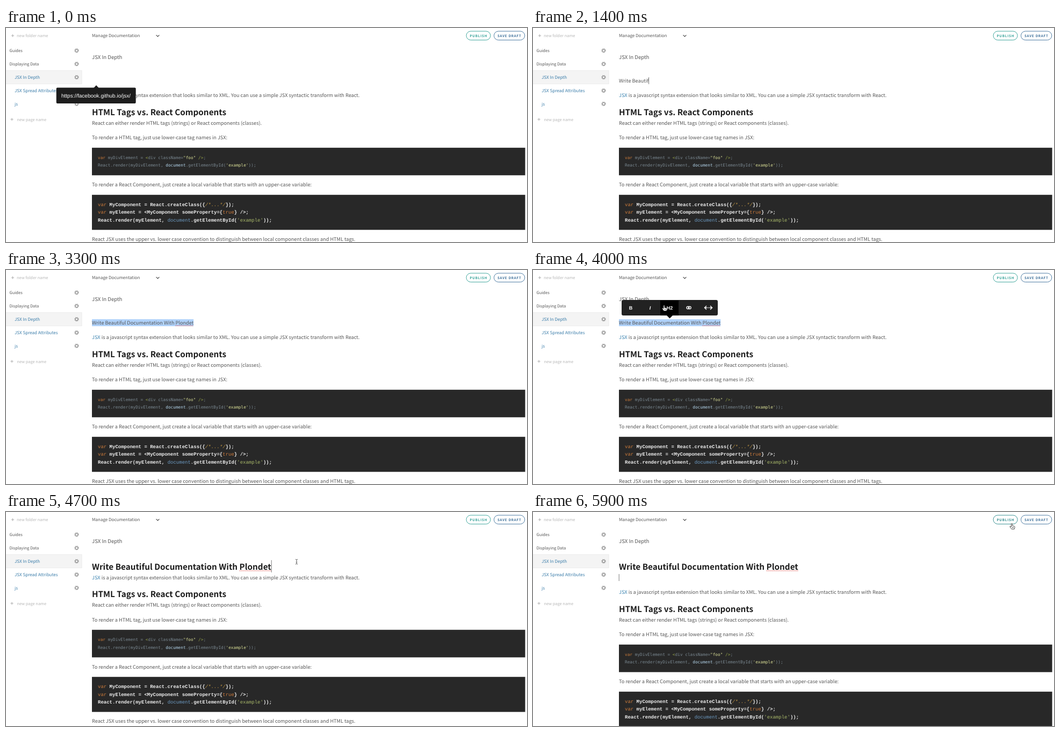
These frames come from a looping animation (970 by 400 pixels, 6150 ms). An HTML page:

```html
<!DOCTYPE html>
<html lang="en">
<head>
<meta charset="utf-8">
<title>Documentation editor</title>
<style>
  html, body { margin: 0; width: 100%; height: 100%; overflow: hidden; background: #fff; }
  svg { display: block; overflow: hidden; }
  text {
    font-family: "Noto Sans CJK JP", "Noto Sans CJK SC", "Noto Sans CJK", "Source Sans Pro", "Open Sans", sans-serif;
    white-space: pre; fill: #565656; text-rendering: geometricPrecision;
  }
  .body { font-size: 9.17px; }
  .title { font-size: 9.6px; }
  .h2 { font-size: 15.25px; font-weight: 700; fill: #1c1c1c; }
  .menu { font-size: 8.03px; }
  .folder { font-size: 7.55px; }
  .page { font-size: 8px; fill: #3a7ca9; }
  .new { font-size: 7.46px; fill: #b8b8b8; }
  .btn { font-size: 6.2px; font-weight: 700; letter-spacing: .8px; }
  .tip { font: 10px "Liberation Sans", Arial, sans-serif; fill: #fff; }
  .tool { font: bold 9px "Liberation Sans", Arial, sans-serif; fill: #fff; text-anchor: middle; }
  .mono { font: 7.78px "DejaVu Sans Mono", monospace; fill: #7a8891; }
  .courier { font: bold 9px "Liberation Mono", "Courier New", monospace; fill: #ececec; }
  .link { fill: #3a83b0; }
  .kw { fill: #cb7a3a; font-weight: 400; }
  .tag { fill: #96a548; }
  .str { fill: #dbe097; }
  .str2 { fill: #a9b96a; font-weight: 400; }
  .doc { fill: #b4d6ec; }
  .doc2 { fill: #6d9bc3; font-weight: 400; }
  .note { fill: #c79a45; font-weight: 400; font-style: italic; }
</style>
</head>
<body>
<svg id="stage" width="970" height="400" viewBox="0 0 970 400"></svg>
<script>
const LOOP = 6150, STEP = 100;
const LINE = "Write Beautiful Documentation With ", NAME = "Plondet";
const FULL = LINE + NAME;

const text = (cls, x, y, s, extra = "") => `<text class="${cls}" x="${x}" y="${y}" ${extra}>${s}</text>`;
const span = (cls, s) => `<tspan class="${cls}">${s}</tspan>`;
const rect = (x, y, w, h, fill, extra = "") =>
  `<rect x="${x}" y="${y}" width="${w}" height="${h}" fill="${fill}" ${extra}/>`;
const path = (d, stroke, width, extra = "") =>
  `<path d="${d}" fill="none" stroke="${stroke}" stroke-width="${width}" ${extra}/>`;

const gear = y => `<g transform="translate(131.5 ${y})" fill="none" stroke="#959595">
  <circle r="2.4" stroke-width="1.3"/>
  <circle r="3.5" stroke-width="1.3" stroke-dasharray="1.5 1.249"/></g>`;
const plus = (x, y) => path(`M${x - 2.6} ${y}h5.2M${x} ${y - 2.6}v5.2`, "#a8a8a8", .9);
const pill = (id, x, w, color, label) =>
  `<g id="${id}">${rect(x, 6, w, 16.5, "#fff", `rx="8.25" stroke="${color}" stroke-width=".9"`)}` +
  text("btn", x + 6.4, 16.9, label, `style="fill:${color}"`) + `</g>`;

const sidebar =
  plus(12.5, 14.3) + text("new", 20, 17, "new folder name") +
  rect(-1, 79.5, 142, 25, "#f4f4f4", 'stroke="#ececec"') +
  text("folder", 6.5, 44.6, "Guides") + text("folder", 6.5, 69.6, "Displaying Data") +
  ["JSX In Depth", "JSX Spread Attributes", "js"]
    .map((s, i) => text("page", 16, 95.1 + 25 * i, s)).join("") +
  [42.2, 67.2, 92, 117, 141.8].map(gear).join("") +
  plus(11, 170.8) + text("new", 20.4, 173.6, "new page name");

const header =
  text("menu", 160, 17.4, "Manage Documentation") +
  path("M279.6 13.2l2.9 2.8 2.9-2.8", "#444", 1.1) +
  pill("publish", 857, 45, "#2f9f95", "PUBLISH") +
  pill("save", 908.5, 57.3, "#3c6f9a", "SAVE DRAFT") +
  text("title", 160, 57.5, "JSX In Depth");

const content =
  text("body", 160, 129.4, span("link", "JSX") +
    " is a javascript syntax extension that looks similar to XML. You can use a simple JSX syntactic transform with React.") +
  text("h2", 160, 162.7, "HTML Tags vs. React Components") +
  text("body", 160, 180.8, "React can either render HTML tags (strings) or React components (classes).") +
  text("body", 160, 208.4, "To render a HTML tag, just use lower-case tag names in JSX:") +
  rect(160, 223.8, 806.6, 51.5, "#282828") +
  text("mono", 171, 245, span("kw", "var") + " myDivElement = " + span("tag", "&lt;") + "div className=" +
    span("str", '"foo"') + span("tag", " /&gt;") + ";") +
  text("mono", 171, 259.4, "React.render(myDivElement, " + span("doc", "document") + ".getElementById(" +
    span("str", "'example'") + "));") +
  text("body", 160, 296.4, "To render a React Component, just create a local variable that starts with an upper-case variable:") +
  rect(160, 311.8, 806.6, 65.5, "#282828") +
  text("courier", 171, 333, span("kw", "var") + " MyComponent = React.createClass({" + span("note", "/*...*/") + "});") +
  text("courier", 171, 347.4, span("kw", "var") + " myElement = &lt;MyComponent someProperty={" + span("kw", "true") + "} /&gt;;") +
  text("courier", 171, 361.8, "React.render(myElement, " + span("doc2", "document") + ".getElementById(" +
    span("str2", "'example'") + "));") +
  text("body", 160, 398, "React JSX uses the upper vs. lower case convention to distinguish between local component classes and HTML tags.");

const tooltip = `<g id="tooltip"><path d="M163.3 112l4.7-5 4.7 5z" fill="#1d1d1d"/>` +
  rect(93.7, 111.5, 148, 29.5, "#1d1d1d", 'rx="2"') +
  text("tip", 103, 129.8, "https://facebook.github.io/jsx/") + `</g>`;

const toolbar = `<g id="toolbar">` + rect(165, 56, 179, 29, "#222", 'rx="3"') +
  `<g id="active">${rect(237, 57, 34, 28, "#000")}</g><path d="M249 85h11l-5.5 5.5z" fill="#0c0c0c"/>` +
  text("tool", 182, 74, "B") + text("tool", 218, 74, "I", 'style="font-style:italic"') +
  text("tool", 254.5, 74, "H2") +
  rect(286, 68.2, 5, 4.6, "none", 'rx="2.3" stroke="#fff" stroke-width="1.3"') +
  rect(289.2, 68.2, 5, 4.6, "none", 'rx="2.3" stroke="#fff" stroke-width="1.3"') +
  path("M323 67l-3.6 3.5 3.6 3.5M330 67l3.6 3.5-3.6 3.5M320 70.5h4.6M328.4 70.5h4.6M325.8 70.5h1.4", "#fff", 1.3) +
  `</g>`;

const pointers =
  `<g id="beam">${path("M-2.2 -4.5q2.2 0 2.2 1.4v6.2q0 1.4-2.2 1.4M2.2 -4.5q-2.2 0-2.2 1.4M2.2 4.5q-2.2 0-2.2-1.4M-1.3 .9h2.6", "#555", .9)}</g>` +
  `<path id="arrow" d="M0 0v8.2l1.9-1.7 1.3 3 1.4-.6-1.3-2.9h2.6z" fill="#111" stroke="#fff" stroke-width=".6"/>` +
  `<path id="hand" d="M-1 .4q1-1.2 2 0v3.8l3.4.8q1.5.5 1.1 2.3l-.9 3.2h-4.9l-3.3-4.3q-.2-1.5 1.3-.9l1.3 1zM1.2 6.6v2M2.8 6.6v2" fill="#fff" stroke="#222" stroke-width=".8" stroke-linejoin="round"/>`;

document.getElementById("stage").innerHTML =
  rect(0, 0, 970, 400, "#fff") + sidebar + header +
  rect(160, 92, 0, 13, "#b0d2fa", 'id="mark"') +
  `<text id="line" x="160"></text>` +
  path("", "#e0554f", 1.2, 'id="squiggle" stroke-dasharray="1.2 1.2"') +
  `<g id="content">${content}</g>` +
  rect(0, 0, .9, 13, "#707070", 'id="caret"') + toolbar + tooltip + `<g id="pointer">${pointers}</g>`;

const $ = id => document.getElementById(id);
const show = (id, on) => $(id).setAttribute("visibility", on ? "inherit" : "hidden");
const set = (id, attrs) => { for (const k in attrs) $(id).setAttribute(k, attrs[k]); };
const within = (t, a, b) => t >= a && t < b;

// Linear interpolation through [time, value...] keys.
function track(keys, t) {
  if (t <= keys[0][0]) return keys[0].slice(1);
  for (let i = 1; i < keys.length; i++) {
    const [a, b] = [keys[i - 1], keys[i]];
    if (t <= b[0]) {
      const k = (t - a[0]) / (b[0] - a[0]);
      return a.slice(1).map((v, j) => v + (b[j + 1] - v) * k);
    }
  }
  return keys[keys.length - 1].slice(1);
}

const typing = [[400, 0], [500, 1], [600, 1], [700, 2], [1400, 13], [2400, 32], [2700, 37], [3000, 42]];
const mouse = [[3600, 300, 100], [3700, 274, 85], [3800, 250, 70], [3900, 244, 66], [4200, 244, 66],
  [4300, 335, 77], [4400, 465, 89], [4500, 541, 93], [4700, 541, 93], [4800, 569.5, 89],
  [4900, 575, 88], [5200, 715, 58], [5500, 893, 18], [5700, 891.5, 21.5]];

function draw(t) {
  const heading = t >= 4100, newline = t >= 4800;
  const selected = within(t, 3200, 4500);
  const line = $("line");

  line.textContent = FULL.slice(0, Math.floor(track(typing, t)[0] + 1e-6));
  set("line", { class: heading ? "h2" : "body", y: heading ? 107.7 : 101.8 });
  const width = line.textContent ? line.getComputedTextLength() : 0;

  set("mark", heading ? { width, y: 91, height: 22 } : { width, y: 92, height: 13 });
  show("mark", selected);

  const spelled = t >= 3100;
  show("squiggle", spelled);
  if (spelled) {
    const x = 160 + line.getSubStringLength(0, LINE.length), y = heading ? 109.8 : 104.2;
    set("squiggle", { d: `M${x} ${y}H${160 + width}` });
  }

  set("content", { transform: `translate(0 ${newline ? 24 : heading ? -3.6 : 0})` });

  show("caret", t >= 300 && !selected && !within(t, 5100, 5500));
  set("caret", newline ? { x: 159.7, y: 116, height: 13 }
    : { x: 160 + width, y: heading ? 90 : 92, height: heading ? 23 : 13 });

  show("tooltip", t < 200);
  show("toolbar", within(t, 3400, 4500));
  set("toolbar", { transform: `translate(0 ${t < 3500 ? 4 : 0})`, opacity: t < 3500 ? .7 : 1 });
  show("active", t >= 3800 && t < 4500);

  const [x, y] = track(mouse, t);
  const kind = within(t, 3800, 4300) || t >= 5500 ? "hand" : newline ? "arrow" : "beam";
  set("pointer", { transform: `translate(${x} ${y})` });
  for (const id of ["beam", "arrow", "hand"]) show(id, id === kind && t >= 3600);

  const tone = t >= 5500 ? "#28878a" : "#2f9f95";
  $("publish").firstChild.setAttribute("stroke", tone);
  $("publish").lastChild.style.fill = tone;
}

const start = performance.now();
function tick() {
  const t = (performance.now() - start) % LOOP;
  draw(Math.floor(t / STEP) * STEP);
  requestAnimationFrame(tick);
}
tick();
</script>
</body>
</html>
```
